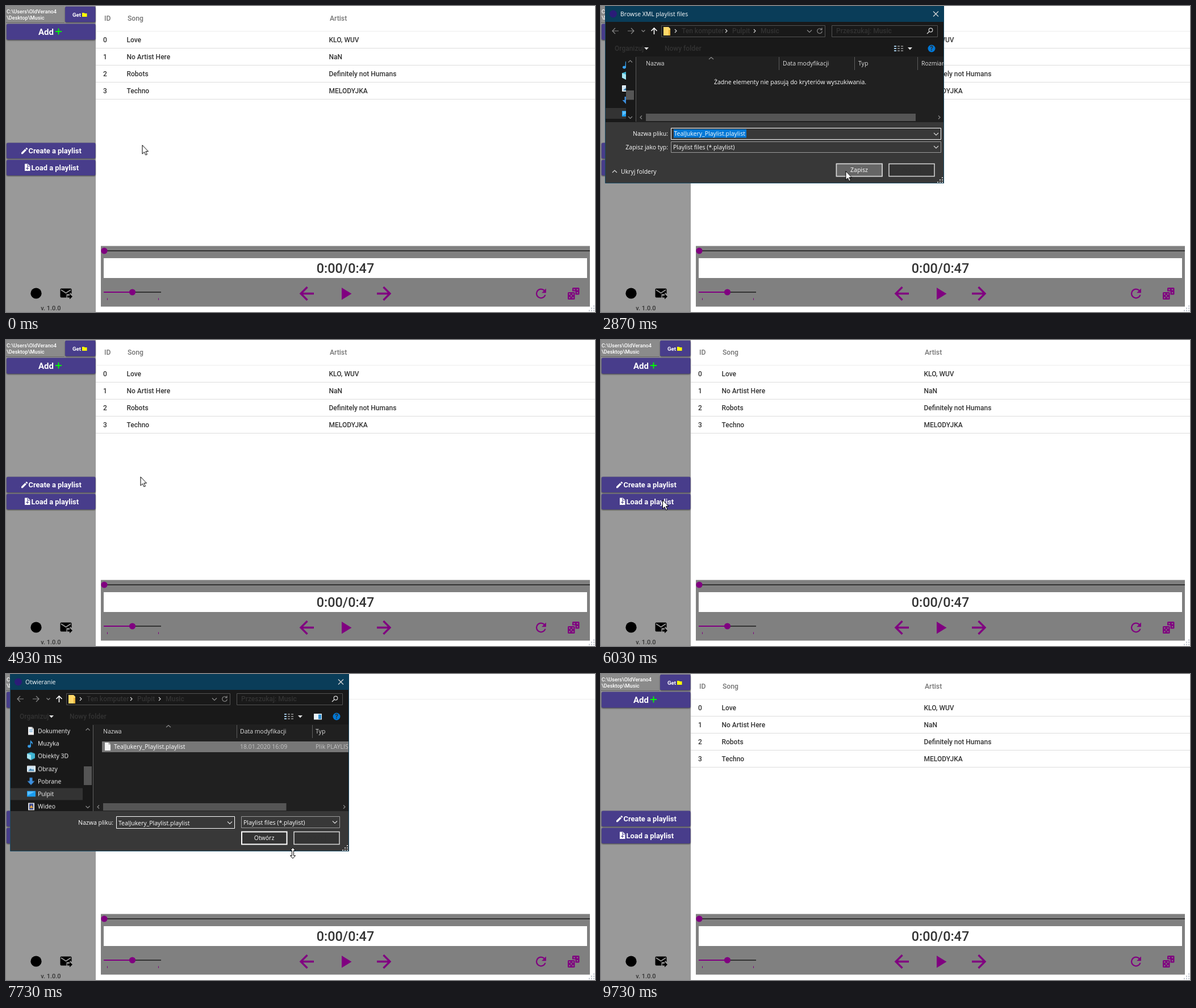
These frames come from a looping animation (1037x540 px, 9760 ms). An HTML page:

```html
<!DOCTYPE html>
<html lang="en">
<head>
<meta charset="utf-8">
<title>Playlist player</title>
<style>
html, body { margin: 0; width: 100%; height: 100%; overflow: hidden; background: #fff; }
svg { display: block; }
#stage { width: 1037px; height: 540px; }
text { font: 500 12px Roboto, sans-serif; fill: #333; white-space: pre; }
.head { fill: #757575; font-size: 12.2px; }
.path { fill: #fff; font-size: 9.2px; }
.btn rect { fill: #483d8b; filter: drop-shadow(0 1px 1px #0009); }
.btn text { fill: #fff; font-weight: 700; font-size: 12.9px; }
.rule { stroke: #dcdcdc; }
.purple { fill: #800080; }
.pline { fill: none; stroke: #800080; stroke-width: 3.4; }
.dlg text { font: 400 10.5px "Open Sans", "Noto Sans", sans-serif; fill: #fff; }
.dlg .dim { fill: #8c8c8c; }
.dlg .col { fill: #dedede; }
.dlg .soft { fill: #c4c4c4; }
.end { text-anchor: end; }
.mid { text-anchor: middle; }
.ln { fill: none; stroke: #d8d8d8; stroke-width: 1.2; }
.faint { stroke: #8a8a8a; }
.thumb { fill: #4d4d4d; }
.sep { stroke: #5c5c5c; }
.box { fill: #383838; stroke: #9b9b9b; }
.push { fill: #333; stroke: #d8d8d8; stroke-width: 1.5; }

/* hard switches */
#songs, #frame1, #body1, #hover, #frame2, #body2, #loading, #ready, #fresh, #picked, #arrow, #sizer, #tree {
  animation: 9.76s step-end infinite;
}
#songs { animation-name: songs; }
#frame1 { animation-name: frame1; }
#body1 { animation-name: body1; }
#hover { animation-name: hover; }
#frame2 { animation-name: frame2; }
#body2 { animation-name: body2; }
#loading, #fresh-nav { animation-name: loading; }
#ready { animation-name: ready; }
#fresh { animation-name: fresh; }
#picked { animation-name: picked; }
#tree { animation-name: tree; }
#arrow { animation-name: arrow; }
#sizer { animation-name: sizer; }
@keyframes songs { 0%, 88.1%, to { opacity: 1 } 62.5% { opacity: 0 } }
@keyframes frame1 { 0%, 31.56%, to { opacity: 0 } 12.8% { opacity: 1 } }
@keyframes body1 { 0% { opacity: 0 } 14.86%, to { opacity: 1 } }
@keyframes hover { 0% { opacity: 0 } 20.5%, to { opacity: 1 } }
@keyframes frame2 { 0%, 86.27%, to { opacity: 0 } 64.55% { opacity: 1 } }
@keyframes body2 { 0% { opacity: 0 } 67.6%, to { opacity: 1 } }
@keyframes loading { 0% { opacity: 1 } 71.7%, to { opacity: 0 } }
@keyframes ready { 0% { opacity: 0 } 71.7%, to { opacity: 1 } }
@keyframes fresh { 0% { opacity: 1 } 76.33%, to { opacity: 0 } }
@keyframes picked { 0% { opacity: 0 } 76.33%, to { opacity: 1 } }
@keyframes tree { 0% { transform: none } 71.7%, to { transform: translateY(-29.6px) } }
@keyframes arrow { 0%, 79.8%, to { opacity: 1 } 79% { opacity: 0 } }
@keyframes sizer { 0%, 79.8%, to { opacity: 0 } 79% { opacity: 1 } }

#pointer { animation: roam 9.76s linear infinite; }
@keyframes roam {
  0%, .31% { transform: translate(239.5px, 245px) }
  1.02%, 3.07% { transform: translate(222px, 248px) }
  5.74% { transform: translate(290px, 395px) }
  8.2% { transform: translate(260px, 130px) }
  11.07%, 12.09% { transform: translate(118px, 252px) }
  14.04%, 14.14% { transform: translate(202px, 248px) }
  19.47% { transform: translate(400px, 285px) }
  24.59% { transform: translate(438px, 292px) }
  29.41%, 30.74% { transform: translate(430.5px, 291px) }
  33.5% { transform: translate(440px, 332px) }
  37.9% { transform: translate(446px, 264px) }
  43.03%, 45.08% { transform: translate(448px, 337px) }
  48.67% { transform: translate(262px, 184px) }
  50.51%, 50.92% { transform: translate(236.5px, 241px) }
  54% { transform: translate(210px, 262px) }
  56.97% { transform: translate(190px, 362px) }
  60.45%, 63.01% { transform: translate(108px, 282px) }
  70.7%, 72.75% { transform: translate(307px, 283.5px) }
  76.13%, 76.84% { transform: translate(250px, 121px) }
  79.2%, 79.6% { transform: translate(505px, 316px) }
  80.43% { transform: translate(505px, 327px) }
  83.5%, 85.55% { transform: translate(458px, 290px) }
  94.98% { transform: translate(238px, 503px) }
  97.03%, to { transform: translate(124px, 542px) }
}
</style>
</head>
<body>
<svg id="stage" viewBox="0 0 1037 540">
  <defs>
    <clipPath id="win"><path d="M8 0H603.5V313H8Z"/></clipPath>
    <clipPath id="treeBox"><path d="M8 89H152V242H8Z"/></clipPath>
    <clipPath id="miniTree"><path d="M8 91H44V203H8Z"/></clipPath>
    <clipPath id="nameBox"><path d="M196 252H386V271H196Z"/></clipPath>
    <g id="grip"><path d="M8 0h2v2h-2zM4 4h2v2h-2zM8 4h2v2h-2zM0 8h2v2h-2zM4 8h2v2h-2zM8 8h2v2h-2z"/></g>
    <g id="chrome">
      <path d="M7 0H604V28H7Z" fill="#0a3d59"/>
      <path d="M7.5 28V312.5H603.5V28" fill="none" stroke="#1b4c66"/>
      <circle cx="21.5" cy="14" r="6.5" fill="#2b1c78"/>
      <path d="M585 9.5l9 9m0-9l-9 9" class="ln" stroke="#fff"/>
    </g>
    <g id="view">
      <path d="M516 70h4v2h-4zM516 74h4v2h-4zM516 78h4v2h-4z" fill="#9ec3dd"/>
      <path d="M522 71h4m2 0h4m-10 4h4m2 0h4m-10 4h4m2 0h4" class="ln"/>
      <path d="M540 73h8l-4 4.5z" fill="#ddd"/>
    </g>
    <g id="help">
      <circle cx="582" cy="75" r="6.5" fill="#0078d7"/>
      <text x="582" y="78.8" class="mid" style="font-weight:700">?</text>
    </g>
    <g id="nav">
      <path d="M31 44H20m5-5l-5 5 5 5M47 44H58m-5-5l5 5-5 5" class="ln faint"/>
      <path d="M71.5 42.5l3 3 3-3" class="ln faint"/>
      <path d="M93.5 50V39m-5 5l5-5 5 5" class="ln" style="stroke:#fff;stroke-width:1.6"/>
      <path d="M106.500 34.500H394.500V54.500H106.500ZM406.500 34.500H592.500V54.500H406.500Z" fill="#191919" stroke="#535353"/>
      <path d="M110 37h9l3 3v12h-12z" fill="#ffd869"/><path d="M119 42h3v10h-3z" fill="#e8b33c"/>
      <path d="M130 41l3 3-3 3M219 41l3 3-3 3M269 41l3 3-3 3" class="ln"/>
      <path d="M363 42.500l4 4 4-4" class="ln faint"/>
      <path d="M388.500 41.500a4.300 4.300 0 1 0 .8 3M389 38.500v3.500h-3.500" class="ln faint"/>
      <circle cx="580.5" cy="42.500" r="3.300" class="ln"/><path d="M578 45l-4 4" class="ln"/>
      <text x="142" y="48">Ten komputer</text><text x="231" y="48">Pulpit</text><text x="281" y="48">Music</text>
      <text x="414" y="48" class="dim">Przeszukaj: Music</text>
      <text x="24" y="79">Organizuj</text><path d="M76 73h8l-4 4.500z" fill="#ddd"/>
      <text x="112" y="79">Nowy folder</text>
    </g>
    <g id="doc"><path d="M0 0h7l3 3v11h-10z" fill="#f4f4f4"/><path d="M7 0v3h3" fill="none" stroke="#999"/></g>
    <g id="picture"><path d="M.5 1.500h14v10h-14z" fill="#cfe6f5" stroke="#fff"/><path d="M2 10l4-4 3 2 2-1 2 3z" fill="#3b7fae"/></g>
    <g id="cube"><path d="M7 0l7 2.500v8L7 14 0 10.500v-8z" fill="#3fb5d3"/><path d="M0 2.500L7 5v9L0 10.500z" fill="#a5e5f2"/></g>
    <g id="down"><path d="M4.500 0h5v6h4l-6.500 7-6.500-7h4z" fill="#3d8fdd"/></g>
    <g id="screen"><path d="M0 1h15v10H0z" fill="#1a9cf0"/><path d="M1 2h13L1 9z" fill="#5cc0ff"/></g>
    <g id="note"><path d="M6 0c1 3 5 3 4 8-1-2-2-3-3-3v6a3 2.500 0 1 1-1.500-2z" fill="#38a0ec"/></g>
    <g id="cancel"><path d="M507 278.500H587V300.500H507Z" class="push"/><text x="546.500" y="293" class="mid">Anuluj</text></g>
  </defs>

  <!-- sidebar -->
  <path d="M0 0H158V540H0Z" fill="#999"/>
  <path d="M0 0H103V29H0Z" fill="#8b8b8b"/>
  <path d="M0 29.500H103" stroke="#666"/>
  <text x="1" y="13" class="path">C:\Users\OldVerano4</text>
  <text x="1" y="24" class="path">\Desktop\Music</text>
  <g class="btn">
    <rect x="104" y="1" width="53.500" height="27.500" rx="2"/>
    <rect x="1" y="31.500" width="156.500" height="28" rx="2"/>
    <rect x="1" y="241.500" width="156.500" height="27.500" rx="2"/>
    <rect x="1" y="271.500" width="156.500" height="27.500" rx="2"/>
    <text x="117" y="18.500" style="font-size:9.6px">Get</text>
    <text x="57" y="50.800" style="font-size:15px">Add</text>
    <text x="39.500" y="260">Create a playlist</text>
    <text x="44.500" y="289.500">Load a playlist</text>
  </g>
  <path d="M134 12h3.500l1 1h4v6h-8.500z" fill="#ff0"/>
  <path d="M92.500 39.500v11M87 45h11" stroke="#0f0" stroke-width="1.800"/>
  <path d="M27 258.800v2.400h2.400l6.600-6.600-2.400-2.400zM34.400 251.400l2.400 2.400 1.200-1.200q.5-.6 0-1.100l-1.300-1.300q-.5-.4-1.100 0z" fill="#fff"/>
  <path d="M33.500 278.500h5l4 4v8.500h-9.500v-12z" fill="#fff"/>
  <path d="M38 279v4h4M37.700 284v5M35.200 286.500h5" fill="none" stroke="#483d8b" stroke-width="1.100"/>
  <circle cx="53" cy="507" r="9.600"/>
  <path d="M97.500 498.500h16q2 0 2 2v7.500l-3-2.500v3h-6v6h-9q-2 0-2-2v-12q0-2 2-2z"/>
  <path d="M97 501l8.500 5.500 8.500-5.500" fill="none" stroke="#999" stroke-width="1.700"/>
  <path d="M108 511h4v-3l5 4.700-5 4.700v-3h-4z"/>
  <text x="79" y="537" class="mid" style="font-size:11px">v. 1.0.0</text>

  <!-- table -->
  <text x="173" y="26" class="head">ID</text><text x="214" y="26" class="head">Song</text><text x="570" y="26" class="head">Artist</text>
  <path d="M158 44.500H1037" stroke="#ececec"/>
  <g id="songs"></g>

  <!-- player -->
  <path d="M167 423.500H1028V530.500H167Z" fill="#808080"/>
  <path d="M173 432H1028M222 505H273" stroke="#333" stroke-width="1.800"/>
  <circle cx="173" cy="432" r="5.600" class="purple"/>
  <path d="M172 445H1023V480H172Z" fill="#fff"/>
  <text x="597.500" y="471" class="mid" style="font-size:23.4px">0:00/0:47</text>
  <path d="M172 505H222" stroke="#800080" stroke-width="1.800"/>
  <path d="M178.500 515.500v3.500M268.500 515.500v3.500" stroke="#800080"/>
  <circle cx="222.500" cy="505" r="5.600" class="purple"/>
  <path d="M542 507.500H519m11.500-11.500L519 507.500l11.500 11.500M653 507.500H676m-11.500-11.500L676 507.500l-11.500 11.500" class="pline"/>
  <path d="M591 497L608.500 507.700 591 518.500Z" class="purple"/>
  <path class="purple" transform="translate(928.5 494) scale(1.12)" d="M17.650 6.350A7.960 7.960 0 0 0 12 4a8 8 0 1 0 7.730 10h-2.080A6 6 0 1 1 12 6c1.660 0 3.140.69 4.220 1.780L13 11h7V4z"/>
  <rect x="997" y="497" width="12.500" height="12.500" rx="1.500" class="purple"/>
  <rect x="987.500" y="503.500" width="15" height="16" fill="#808080"/>
  <rect x="989" y="505" width="12.500" height="13" rx="1.500" class="purple"/>
  <g fill="#808080">
    <circle cx="1000.500" cy="500.500" r="1.200"/><circle cx="1006" cy="500.500" r="1.200"/><circle cx="1006" cy="506" r="1.200"/>
    <circle cx="992.300" cy="508.300" r="1.200"/><circle cx="998.200" cy="514.700" r="1.200"/><circle cx="995.200" cy="511.500" r="1.200"/>
    <circle cx="992.300" cy="514.700" r="1.200"/><circle cx="998.200" cy="508.300" r="1.200"/>
  </g>
  <use href="#grip" x="1026" y="528.500" fill="#b5bcc8"/>

  <!-- save dialog -->
  <g class="dlg" id="frame1">
    <g id="body1" clip-path="url(#win)">
      <path d="M8 28H604V89H8Z" fill="#191919"/><path d="M8 89H604V205H8Z" fill="#202020"/>
      <path d="M8 89H61V205H8Z" fill="#191919"/><path d="M8 205H604V313H8Z" fill="#383838"/>
      <use href="#nav"/><use href="#view"/><use href="#help"/>
      <g clip-path="url(#miniTree)">
        <path d="M8 180H44V199H8Z" fill="#333"/>
        <use href="#note" x="37" y="97"/><use href="#cube" x="37" y="116"/><use href="#picture" x="37" y="139"/>
        <use href="#down" x="37" y="160"/><use href="#screen" x="37" y="184"/>
      </g>
      <path d="M44 149H58V165.500H44ZM79 190H554V203H79Z" class="thumb" style="fill:#555"/>
      <path d="M48 99.500l3.500-3.500 3.500 3.500M48 195l3.500 3.500 3.500-3.500M72 193.500l-3 3 3 3M594 193.500l3 3-3 3M190 94l4-3.500 4 3.500" class="ln faint"/>
      <path d="M61.500 90V204M313.500 90V113M446.500 90V113M557.500 90V113" class="sep"/>
      <text x="79" y="105" class="col">Nazwa</text><text x="320" y="105" class="col">Data modyfikacji</text>
      <text x="453" y="105" class="col">Typ</text><text x="564" y="105" class="col">Rozmiar</text>
      <text x="333" y="137.500" class="mid">Żadne elementy nie pasują do kryteriów wyszukiwania.</text>
      <text x="118" y="229" class="end">Nazwa pliku:</text><text x="118" y="252.500" class="end">Zapisz jako typ:</text>
      <path d="M123.500 215.500H598.500V235.500H123.500Z" class="box" style="stroke:#fff"/>
      <path d="M123.500 239.500H598.500V258.500H123.500Z" class="box"/>
      <path d="M128 217.500H256V232.500H128Z" fill="#0078d7"/>
      <text x="128.500" y="229">TealJukery_Playlist.playlist</text><text x="127" y="252.500">Playlist files (*.playlist)</text>
      <path d="M586 224l4 4 4-4M586 247l4 4 4-4M20 294l4-4 4 4" class="ln"/>
      <text x="35" y="296">Ukryj foldery</text>
      <path d="M414.500 278.500H495V300.500H414.500Z" class="push"/>
      <path id="hover" d="M414.500 278.500H495V300.500H414.500Z" class="push" style="fill:#666"/>
      <text x="454.500" y="293" class="mid">Zapisz</text>
      <use href="#cancel"/><use href="#grip" x="592" y="302" fill="#ccc"/>
    </g>
    <use href="#chrome"/><text x="34" y="18">Browse XML playlist files</text>
  </g>

  <!-- open dialog -->
  <g class="dlg" id="frame2">
    <g id="body2" clip-path="url(#win)">
      <path d="M8 28H604V89H8Z" fill="#191919"/><path d="M8 89H604V242H8Z" fill="#202020"/>
      <path d="M8 89H152V242H8Z" fill="#191919"/><path d="M8 242H604V313H8Z" fill="#383838"/>
      <g id="loading">
        <path d="M11 31H82V29.500H104V31H396V57H82V58H11ZM405 31H593V56.500H405ZM399 43H405V44.500H399ZM597 43H604V44.500H597Z" fill="#fff"/>
        <path d="M137 116H151V167H137Z" class="thumb" style="fill:#555"/>
      </g>
      <g id="ready">
        <use href="#nav"/><use href="#view" x="-26"/>
        <path d="M137 163H151V196H137Z" class="thumb" style="fill:#555"/>
      </g>
      <path d="M542 70H556V80.500H542Z" fill="#e9f3fa"/><path d="M550 71.500H555V79.500H550Z" fill="#2f8fd0"/>
      <use href="#help"/>
      <g clip-path="url(#treeBox)"><g id="tree">
        <path d="M8 231H135V252H8Z" fill="#333"/>
        <use href="#screen" x="30" y="101"/><path d="M34 114h8" stroke="#bcd" stroke-width="2"/>
        <use href="#doc" x="39" y="123"/><path d="M41 128h6m-6 3h6" stroke="#3b8fd0"/>
        <use href="#note" x="37" y="146"/><use href="#cube" x="37" y="167.500"/><use href="#picture" x="37" y="190.500"/>
        <use href="#down" x="37" y="212.500"/><use href="#screen" x="37" y="235"/>
        <path d="M39 257H50V270H39Z" fill="#ddd"/><path d="M41 258.500H48V268.500H41Z" fill="#35478f"/><path d="M42 264l3-3 3 5h-6z" fill="#e5a33d"/>
        <g id="places"></g>
      </g></g>
      <path d="M140.500 99.500l3.500-3.500 3.500 3.500M140.500 233l3.500 3.500 3.500-3.500M164 231.500l-3 3 3 3M594 231.500l3 3-3 3M282 94l4-3.500 4 3.500" class="ln faint"/>
      <path d="M171 228H493.500V241H171Z" class="thumb" style="fill:#555"/>
      <path d="M153.500 90V242M406.500 90V113M539.500 90V113" class="sep"/>
      <text x="171" y="105" class="col">Nazwa</text><text x="412" y="105" class="col">Data modyfikacji</text><text x="545" y="105" class="col">Typ</text>
      <text x="189" y="266" class="end">Nazwa pliku:</text>
      <path d="M194.500 251.500H402.500V272.500H194.500Z" class="box" style="stroke:#fff"/>
      <path d="M414.500 251.500H587.500V271.500H414.500Z" class="box"/>
      <text x="418" y="265.500">Playlist files (*.playlist)</text>
      <g id="fresh" clip-path="url(#nameBox)">
        <path d="M196 254.500H275.500V270H196Z" fill="#0078d7"/>
        <text x="275" y="266.500" class="end">TealJukery_Playlist</text>
      </g>
      <g id="picked">
        <path d="M169 119H604V138H169Z" fill="#777"/>
        <text x="198" y="266.500">TealJukery_Playlist.playlist</text>
      </g>
      <use href="#doc" x="174" y="121"/>
      <text x="190" y="132">TealJukery_Playlist.playlist</text>
      <text x="412" y="132" class="soft">18.01.2020 16:09</text><text x="545" y="132" class="soft">Plik PLAYLIST</text>
      <path d="M390 260.500l4 4 4-4M575 259.500l4 4 4-4" class="ln"/>
      <path d="M415 278.500H494.500V300.500H415Z" class="push" style="stroke:#fff;stroke-width:2"/>
      <text x="454.500" y="293" class="mid">Otwórz</text>
      <use href="#cancel"/><use href="#grip" x="592" y="302" fill="#ccc"/>
    </g>
    <use href="#chrome"/><text x="34" y="18">Otwieranie</text>
  </g>

  <g id="pointer" fill="#fff" stroke="#000">
    <path id="arrow" d="M.5 .5V16L4 12.600 6.400 18 8.900 17 6.500 11.600H11Z"/>
    <path id="sizer" d="M0-9.500L4.500-4.500H1.500V4.500H4.500L0 9.500-4.500 4.500H-1.500V-4.500H-4.500Z"/>
  </g>
</svg>
<script>
const songs = [
  ["Love", "KLO, WUV"],
  ["No Artist Here", "NaN"],
  ["Robots", "Definitely not Humans"],
  ["Techno", "MELODYJKA"],
];
const places = ["Dokumenty", "Muzyka", "Obiekty 3D", "Obrazy", "Pobrane", "Pulpit", "Wideo"];
const label = (x, y, s) => `<text x="${x}" y="${y}">${s}</text>`;

document.getElementById("songs").innerHTML = songs.map(([song, artist], i) => {
  const y = 64 + Math.round(i * 30.1);
  return label(171, y, i) + label(212.5, y, song) + label(568.5, y, artist) +
    `<path class="rule" d="M158 ${74.5 + Math.round(i * 30.1)}H1037"/>`;
}).join("");

document.getElementById("places").innerHTML = label(49, 112, "Ten komputer") +
  places.map((name, i) => label(56, 134 + i * 22.2, name)).join("");
</script>
</body>
</html>
```
